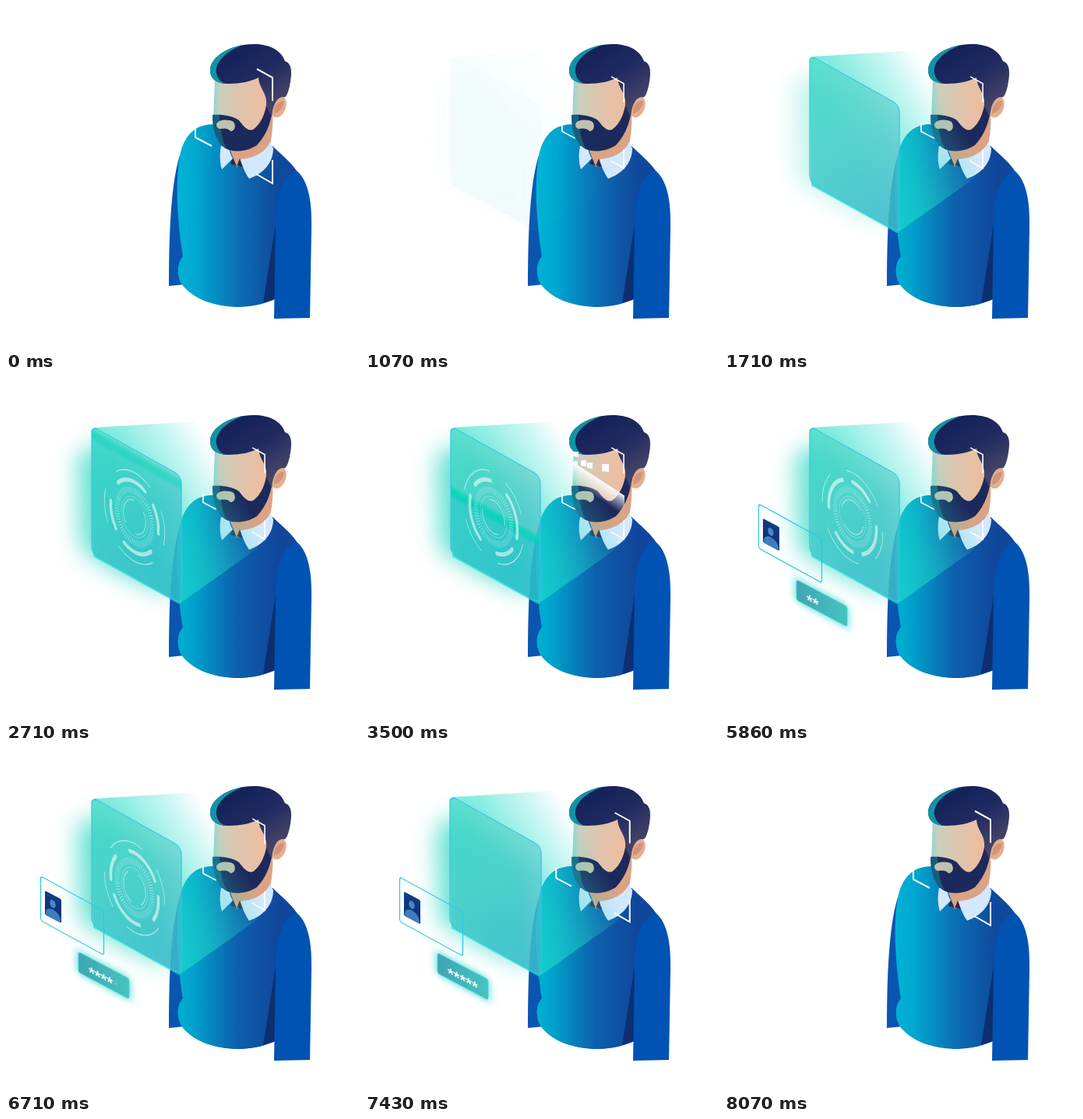
An HTML page that plays this animation: 453x441 px, repeating every 8140 ms.

```html
<!DOCTYPE html>
<html lang="en">
<head>
<meta charset="utf-8">
<title>Face scan</title>
<style>
  html, body { margin: 0; width: 100%; height: 100%; overflow: hidden; background: #fff; }
  svg { display: block; width: 100vw; height: 100vh; }
  text { font: bold 20px "Liberation Sans", Arial, sans-serif; fill: #fff; fill-opacity: .9; text-anchor: middle; }
</style>
</head>
<body>
<svg viewBox="0 0 453 441" fill="none">
  <defs>
    <linearGradient id="sweater" gradientUnits="userSpaceOnUse" x1="220" y1="0" x2="350" y2="0">
      <stop stop-color="#00b3d5"/><stop offset=".2" stop-color="#00a6cf"/>
      <stop offset=".62" stop-color="#0b6cb3"/><stop offset="1" stop-color="#10489c"/>
    </linearGradient>
    <linearGradient id="sweaterLit" gradientUnits="userSpaceOnUse" x1="220" y1="0" x2="350" y2="0">
      <stop stop-color="#00b0d2"/><stop offset=".18" stop-color="#009fca"/>
      <stop offset=".58" stop-color="#0d60ad"/><stop offset="1" stop-color="#11469b"/>
    </linearGradient>
    <linearGradient id="skin" gradientUnits="userSpaceOnUse" x1="266" y1="0" x2="336" y2="0">
      <stop stop-color="#8fd8d0"/><stop offset=".12" stop-color="#c9d0bd"/>
      <stop offset=".5" stop-color="#dfc4ad"/><stop offset="1" stop-color="#efbc9d"/>
    </linearGradient>
    <linearGradient id="hair" gradientUnits="userSpaceOnUse" x1="300" y1="55" x2="345" y2="125">
      <stop stop-color="#15225b"/><stop offset=".5" stop-color="#202b60"/><stop offset="1" stop-color="#454468"/>
    </linearGradient>
    <linearGradient id="beam" gradientUnits="userSpaceOnUse" x1="110" y1="110" x2="233" y2="36">
      <stop stop-color="#1fdcca" stop-opacity=".68"/><stop offset=".4" stop-color="#22dcca" stop-opacity=".5"/>
      <stop offset=".72" stop-color="#26dccc" stop-opacity=".26"/><stop offset="1" stop-color="#30d8d0" stop-opacity="0"/>
    </linearGradient>
    <linearGradient id="glass" x1="0" y1="0" x2=".8" y2="1">
      <stop stop-color="#4bdac4"/><stop offset=".5" stop-color="#58cac8"/><stop offset="1" stop-color="#45aecb"/>
    </linearGradient>
    <linearGradient id="sweep" x1="0" y1="0" x2="0" y2="1">
      <stop stop-color="#00d8b4" stop-opacity="0"/><stop offset=".35" stop-color="#00d8b4" stop-opacity=".85"/>
      <stop offset=".6" stop-color="#00d0ba" stop-opacity=".7"/><stop offset="1" stop-color="#00c8c0" stop-opacity="0"/>
    </linearGradient>
    <linearGradient id="whiteFade" x1="0" y1="0" x2="0" y2="1">
      <stop stop-color="#fff" stop-opacity=".95"/><stop offset=".3" stop-color="#fff" stop-opacity=".6"/>
      <stop offset="1" stop-color="#fff" stop-opacity="0"/>
    </linearGradient>
    <linearGradient id="field" x1="0" y1="0" x2="1" y2="0">
      <stop stop-color="#3fa5b4"/><stop offset="1" stop-color="#45c4bf"/>
    </linearGradient>
    <linearGradient id="photo" x1="0" y1="0" x2="0" y2="1">
      <stop stop-color="#103d86"/><stop offset="1" stop-color="#0a3073"/>
    </linearGradient>
    <filter id="blur" x="-60%" y="-60%" width="220%" height="220%"><feGaussianBlur stdDeviation="15"/></filter>
    <filter id="softBlur" x="-60%" y="-60%" width="220%" height="220%"><feGaussianBlur stdDeviation="5"/></filter>
    <clipPath id="panelClip"><rect width="115" height="164" rx="8"/></clipPath>
    <clipPath id="photoClip"><rect width="21" height="31" rx="2"/></clipPath>
    <clipPath id="faceClip"><path d="M267 80H333V165L322 179C308 188 290 188 280 182C268 172 265 155 266 140Z"/></clipPath>
    <path id="torso" d="M270 152C246 151 231 162 224 188C217 220 219 270 227 322C219 331 219 346 225 357C240 378 270 387 300 387C320 386 335 382 347 376L373 212C365 200 352 190 342 180L285 180Z"/>
  </defs>

  <g id="glow" filter="url(#blur)">
    <path d="M92 100L125 86L215 150L212 280L150 255L96 222Z" fill="#46dccb"/>
  </g>

  <g id="man">
    <path d="M223 192C211 230 209 300 209 360L229 358V200Z" fill="#0a55b0"/>
    <use href="#torso" fill="url(#sweater)"/>
    <use href="#torso" id="litTorso" fill="url(#sweaterLit)"/>
    <path d="M348 268L330 382L347 376Z" fill="#0d2f70"/>
    <path d="M372 211C386 222 393 245 392 285L390 401L344 402L346 280C347 240 355 220 372 211Z" fill="#0053b3"/>
    <path d="M285 178L296 207L338 184C342 165 343 150 342 138L310 165Z" fill="#dba384"/>
    <path d="M288 203L291 195L296 206L300 196L304 207Z" fill="#28294a"/>
    <path d="M276 180L286 181Q287 190 291 196L277 210C274 200 274 190 276 180Z" fill="#d4e8fd"/>
    <path d="M301 197C318 196 333 188 339 175L343 183C343 200 332 215 312 222C306 213 303 205 301 197Z" fill="#d4e8fd"/>
    <path d="M268 92L326 88L338 125L334 158L300 170L266 146Z" fill="url(#skin)"/>
    <ellipse cx="350" cy="130" rx="9" ry="14" transform="rotate(22 350 130)" fill="#e6ae8d"/>
    <path d="M344 138C344 127 349 122 357 122C356 131 351 137 344 138Z" fill="#d0947a"/>
    <path d="M265 140C276 139 291 141 299 147C305 155 310 161 317 159C328 151 333 137 335 122H342C343 145 335 165 322 179C308 188 290 189 280 182C268 172 265 155 265 140Z" fill="#1c295c"/>
    <path d="M265 140L274 140C275 158 277 172 283 183C268 174 265 158 265 140Z" fill="#157f93" opacity=".6"/>
    <path d="M270 152C272 146 285 145 292 149C296 155 293 161 288 161C284 156 278 158 274 158C271 157 270 155 270 152Z" fill="#bfc2ad"/>
    <path d="M262 83C262 68 280 54 305 50C330 46 352 53 358 71C368 74 367 88 364 103C361 115 359 119 354 117C346 119 342 130 341 143L334 128C336 112 325 107 324 92C315 97 300 100 285 100C270 100 262 93 262 83Z" fill="url(#hair)"/>
    <path d="M262 83C262 68 280 54 305 50C282 58 268 72 270 86C272 95 276 98 283 100C268 99 262 93 262 83Z" fill="#1194a7"/>
  </g>

  <g id="projection">
    <path d="M114 65L246 57L330 165L322 221L222 292L112 231L110 70Z" fill="url(#beam)"/>
    <g transform="matrix(1 .56 0 1 110 63)">
      <rect width="115" height="164" rx="8" fill="url(#glass)" fill-opacity=".62"/>
      <g id="panelScan" clip-path="url(#panelClip)">
        <rect id="scanWash" width="115" height="164" fill="#00c3c8" opacity=".28"/>
        <rect id="scanLine" width="115" height="19" fill="url(#sweep)"/>
      </g>
      <rect width="115" height="164" rx="8" stroke="#35c3e6" stroke-width="1.200"/>
    </g>
    <g id="hud" transform="matrix(.68 .38 0 1 165 180)" stroke="#fff"></g>
  </g>

  <g id="faceScan" clip-path="url(#faceClip)">
    <rect id="faceBeam" width="66" height="26" fill="url(#whiteFade)"/>
  </g>
  <g id="marks" fill="#fff"></g>

  <g id="brackets" stroke="#fff" stroke-width="2">
    <path d="M322 81L342 92V122M243 155V169L264 180M321 216L342 228V198"/>
  </g>

  <g id="card">
    <g transform="matrix(1 .55 0 1 44.500 164.500)">
      <rect width="81" height="57" rx="3" stroke="#2fc8e8" stroke-width="1.300"/>
    </g>
    <g id="avatar" transform="matrix(1 .53 0 1 50 183)">
      <g clip-path="url(#photoClip)">
        <rect width="21" height="31" fill="url(#photo)"/>
        <ellipse cx="10" cy="12" rx="3.700" ry="5" fill="#4a86c4"/>
        <ellipse cx="10.500" cy="28" rx="9.500" ry="9" fill="#3f7dbf"/>
      </g>
    </g>
  </g>

  <g id="password">
    <g transform="matrix(1 .53 0 1 93 262)">
      <rect x="-2" y="-2" width="69" height="30" rx="4" fill="#3fd8d8" opacity=".8" filter="url(#softBlur)"/>
      <rect width="65" height="26" rx="3" fill="url(#field)" stroke="#52cfd0" stroke-width=".8"/>
      <g id="stars"></g>
    </g>
  </g>
</svg>
<script>
const LOOP = 8140;
const NS = "http://www.w3.org/2000/svg";
const $ = id => document.getElementById(id);
const clamp = x => Math.max(0, Math.min(1, x));
const span = (t, from, to) => clamp((t - from) / (to - from));
const ease = p => p < .5 ? 4 * p ** 3 : 1 - (2 - 2 * p) ** 3 / 2;
const pulse = (t, a, b, c, d) => ease(span(t, a, b)) * (1 - ease(span(t, c, d)));
const fade = (id, value) => $(id).setAttribute("opacity", value.toFixed(3));
const move = (node, value) => node.setAttribute("transform", value);
const scaleAt = (x, y, s) => `translate(${x} ${y}) scale(${s}) translate(${-x} ${-y})`;

function add(parent, tag, attrs) {
  const node = document.createElementNS(NS, tag);
  for (const key in attrs) node.setAttribute(key, attrs[key]);
  return parent.appendChild(node);
}

function arc(parent, radius, middle, sweep, attrs) {
  const at = deg => {
    const a = deg * Math.PI / 180;
    return `${(radius * Math.cos(a)).toFixed(2)} ${(radius * Math.sin(a)).toFixed(2)}`;
  };
  const d = `M${at(middle - sweep / 2)}A${radius} ${radius} 0 0 1 ${at(middle + sweep / 2)}`;
  add(parent, "path", { d, ...attrs });
}

const hud = $("hud");
const outerRing = add(hud, "g", {}), thickRing = add(hud, "g", {}), innerRing = add(hud, "g", {});
const round = { "stroke-linecap": "round" };
for (const side of [0, 180]) {
  arc(outerRing, 57, side - 15, 68, { "stroke-width": 1.2, opacity: .6 });
  arc(outerRing, 57, side + 72, 44, { "stroke-width": 1.2, opacity: .6 });
  arc(thickRing, 45, side + 105, 70, { "stroke-width": 5, opacity: .56, ...round });
  arc(thickRing, 45, side + 7, 44, { "stroke-width": 5, opacity: .56, ...round });
  arc(innerRing, 21, side, 125, { "stroke-width": 2, opacity: .35 });
}
add(innerRing, "circle", { r: 33, "stroke-width": 8, "stroke-dasharray": "1.1 2.2", opacity: .38 });
add(innerRing, "circle", { r: 25, "stroke-width": 1, opacity: .3 });

// x, y, size, first and last moment of each facial point
const marks = [
  [268, 96, 6, 3250, 3750], [268, 108, 5, 3300, 3800], [277, 107, 7, 3350, 3900],
  [285, 110, 7, 3400, 3950], [304, 112, 9, 3400, 4050], [272, 138, 6, 3800, 4350],
  [283, 147, 6, 4050, 4800], [278, 158, 5, 4200, 4950]
].map(([x, y, size, from, to]) => ({
  from, to, node: add($("marks"), "path", { d: `M${x} ${y}h${size}v${size + 1}l${-size}-1Z` })
}));

const stars = Array.from({ length: 5 }, (_, i) => {
  const star = add($("stars"), "text", { x: 17 + i * 7.7, y: 25 });
  star.textContent = "*";
  return star;
});

function render(t) {
  const shrink = ease(span(t, 0, 860)) * (1 - ease(span(t, 7000, 7700)));
  move($("brackets"), scaleAt(292.5, 130.5, 1 - .2 * shrink));

  const panel = pulse(t, 900, 1600, 7430, 7710);
  const swell = 1 + .018 * ease(span(t, 7000, 7430));
  fade("projection", panel);
  fade("litTorso", panel);
  move($("projection"), scaleAt(167.5, 178, swell));
  fade("glow", panel * (.35 + .5 * ease(span(t, 1700, 2500))));

  fade("hud", pulse(t, 1800, 2450, 6930, 7350));
  const turn = (t - 4790) * .098;
  move(thickRing, `rotate(${turn})`);
  move(outerRing, `rotate(${-turn * .5})`);
  move(innerRing, `rotate(${-turn})`);

  const scanY = 84 + (t - 3500) * .093;
  fade("panelScan", pulse(t, 2600, 2800, 4250, 4500));
  $("scanLine").setAttribute("y", scanY - 9);
  $("scanWash").setAttribute("y", scanY);
  fade("faceScan", pulse(t, 2800, 3100, 4250, 4500));
  move($("faceBeam"), `matrix(1 .65 0 1 267 ${109.5 + (t - 3500) * .045})`);
  for (const { node, from, to } of marks) {
    node.setAttribute("opacity", pulse(t, from - 60, from + 60, to - 120, to));
  }

  const bob = -1.4 * Math.cos((t - 5860) / 1570 * Math.PI);
  fade("card", pulse(t, 3900, 4400, 7710, 8050));
  fade("avatar", ease(span(t, 4350, 4700)));
  move($("card"), `translate(0 ${bob})`);
  fade("password", pulse(t, 5000, 5400, 7710, 8050));
  move($("password"), `translate(0 ${bob})`);
  stars.forEach((star, i) => star.setAttribute("opacity", span(t, 5380 + i * 330, 5480 + i * 330)));
}

function frame() {
  render(performance.now() % LOOP);
  requestAnimationFrame(frame);
}
frame();
</script>
</body>
</html>
```
